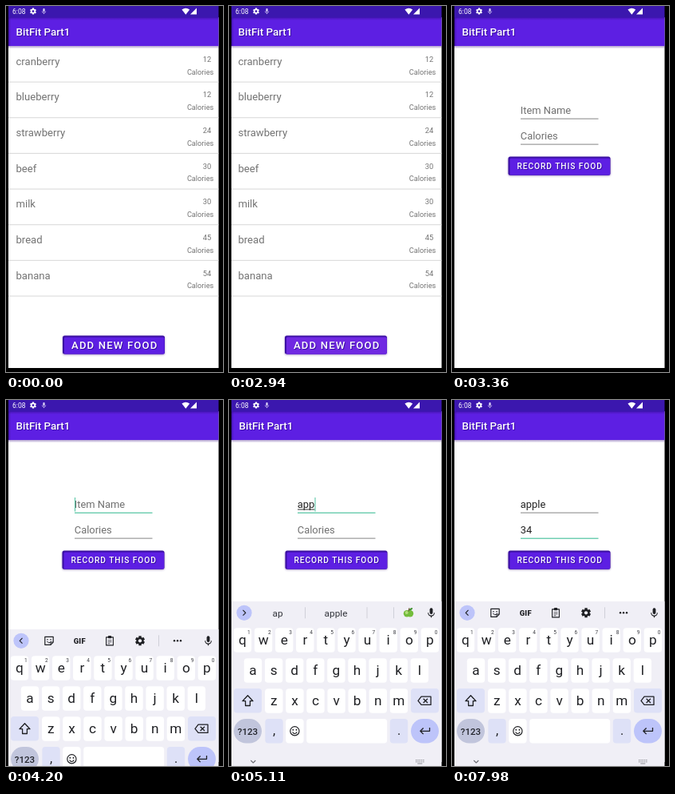
Write an HTML page with a canvas that moves like this. It is 272 px wide and 458 px high and loops after 8000 ms.

```html
<!DOCTYPE html>
<html lang="en">
<head>
<meta charset="utf-8">
<title>Food list</title>
<style>
html, body { margin: 0; width: 100%; height: 100%; overflow: hidden; background: #000; }
canvas { display: block; width: 272px; height: 458px; }
</style>
</head>
<body>
<canvas id="stage"></canvas>
<script>
const W = 272, H = 458, LOOP = 8000, STEP = 70;
const PURPLE = '#5d1fe3', DEEP = '#3a0fa2', TEAL = '#4fc3a0', INK = '#1f2024', GREY = '#737373';
const canvas = document.getElementById('stage');
const c = canvas.getContext('2d');
const dpr = window.devicePixelRatio || 1;
canvas.width = W * dpr;
canvas.height = H * dpr;

const clamp = v => Math.max(0, Math.min(1, v));
const font = (size, weight = 400) => `${weight} ${size}px Roboto, sans-serif`;

function text(s, x, y, size, color, { weight = 400, align = 'left', space = 0 } = {}) {
  c.font = font(size, weight);
  c.letterSpacing = space + 'px';
  c.textAlign = align;
  c.fillStyle = color;
  c.fillText(s, x, y);
  c.letterSpacing = '0px';
}

// White text with a dark edge to the lower right.
function raisedText(s, x, y, size, space = 0) {
  const style = { weight: 500, space };
  text(s, x + 1, y + .9, size, DEEP, style);
  text(s, x, y, size, '#fff', style);
}

function rect(x, y, w, h, color) {
  c.fillStyle = color;
  c.fillRect(x, y, w, h);
}

function round(x, y, w, h, r, color) {
  c.beginPath();
  c.roundRect(x, y, w, h, r);
  c.fillStyle = color;
  c.fill();
}

function disc(x, y, r, color) {
  c.beginPath();
  c.arc(x, y, r, 0, 7);
  c.fillStyle = color;
  c.fill();
}

function arc(x, y, r, from, to, color = INK, width = 1.1) {
  c.beginPath();
  c.arc(x, y, r, from, to);
  c.strokeStyle = color;
  c.lineWidth = width;
  c.stroke();
}

// Strokes a flat list of x, y pairs.
function line(pts, color = INK, width = 1.2, close = false) {
  c.beginPath();
  for (let i = 0; i < pts.length; i += 2) c.lineTo(pts[i], pts[i + 1]);
  if (close) c.closePath();
  c.strokeStyle = color;
  c.lineWidth = width;
  c.lineJoin = 'round';
  c.stroke();
}

function shade(x, y, w, h, color, across = false) {
  const g = c.createLinearGradient(x, y, across ? x + w : x, across ? y : y + h);
  g.addColorStop(0, color);
  g.addColorStop(1, 'rgba(60,20,140,0)');
  rect(x, y, w, h, g);
}

function at(x, y, draw) {
  c.save();
  c.translate(x, y);
  draw();
  c.restore();
}

function gear(x, y, r, color, hole) {
  at(x, y, () => {
    for (let i = 0; i < 6; i++) {
      c.rotate(Math.PI / 3);
      rect(-r * .28, -r, r * .56, r, color);
    }
    disc(0, 0, r * .76, color);
    disc(0, 0, r * .36, hole);
  });
}

function mic(x, y, k, color) {
  at(x, y, () => {
    c.scale(k, k);
    round(-1.9, -6, 3.8, 7.6, 1.9, color);
    arc(0, 0, 3.8, 0, Math.PI, color);
    line([0, 3.7, 0, 6], color, 1.2);
  });
}

function statusBar() {
  rect(3, 0, 264, 14.5, '#3b17ae');
  text('6:08', 8, 10, 8.6, '#fff');
  gear(34, 6.6, 4, '#fff', '#3b17ae');
  mic(47.5, 6.5, .6, '#ded5f8');
  c.fillStyle = '#fff';
  c.beginPath();
  c.moveTo(225.3, 10.7);
  c.lineTo(220.4, 4.6);
  c.quadraticCurveTo(225.3, 1, 230.2, 4.6);
  c.fill();
  c.beginPath();
  c.moveTo(239, 2.6);
  c.lineTo(239, 10.6);
  c.lineTo(231, 10.6);
  c.fill();
}

function page(dx, draw) {
  rect(3, 14, 264, 439, '#fff');
  rect(3, 14, 264, 36, PURPLE);
  shade(3, 14, 264, 4, 'rgba(40,5,130,.5)');
  shade(3, 14, 3, 36, 'rgba(40,5,130,.6)', true);
  shade(3, 50, 264, 3.5, 'rgba(90,50,150,.45)');
  at(dx, 0, () => {
    raisedText('BitFit Part1', 12.6, 37, 13.4);
    draw();
  });
}

function button(label, x, y, base, size, ripple = 0) {
  c.save();
  c.shadowColor = 'rgba(60,10,130,.5)';
  c.shadowBlur = 2.5 * dpr;
  c.shadowOffsetY = .8 * dpr;
  round(x, y, 128, 23.2, 2.5, DEEP);
  c.restore();
  c.save();
  c.beginPath();
  c.roundRect(x + 2, y + 2, 125.6, 21, 1.5);
  c.clip();
  rect(x, y, 128, 24, PURPLE);
  if (ripple) disc(x + 64, y + 12, 70 * ripple, '#7029e2');
  c.restore();
  raisedText(label, x + 11, base, size, size * .0893);
}

const foods = [['cranberry', 12], ['blueberry', 12], ['strawberry', 24],
  ['beef', 30], ['milk', 30], ['bread', 45], ['banana', 54]];

function listPage(dx, ripple) {
  page(dx, () => {
    foods.forEach(([name, kcal], i) => {
      const y = i * 44.65;
      text(name, 12.5, y + 73.7, 13.1, GREY);
      text(kcal, 252, y + 69.8, 9.3, GREY, { align: 'center' });
      text('Calories', 260.3, y + 85.5, 9.2, GREY, { align: 'right' });
      rect(-30, y + 94.6, 330, 1, '#d8d8d8');
    });
    button('ADD NEW FOOD', 71, 412.4, 429, 13.1, ripple);
  });
}

function field(value, hint, y, focused, cursor, composing) {
  text(value || hint, 85.8, y, 12.9, value ? '#222' : '#707070');
  const w = value ? c.measureText(value).width : 0;
  if (composing) rect(86, y + 1.5, w, 1, '#333');
  rect(86, y + 5.6, 97.5, focused ? 1.2 : 1, focused ? TEAL : '#858585');
  if (cursor) rect(86 + w, y - 13, 1, 17.5, TEAL);
}

// Latest entry of a [time, value] list.
const pick = (list, t) => list.reduce((v, e) => t >= e[0] ? e[1] : v, list[0][1]);

const names = [[0, ''], [4620, 'a'], [5040, 'ap'], [5110, 'app'], [5320, 'appl'], [5460, 'apple']];
const amounts = [[0, ''], [7280, '3'], [7490, '34']];
const hints = [[0, null], [4690, []], [4760, ['a', 'and', 'as']], [5110, ['ap', 'apple']],
  [5180, ['app', 'apple']], [5390, ['appl', 'apple']], [5670, ['apple', 'apples']], [5950, null]];
const blink = [[0, false], [5950, true], [6510, false], [7070, true], [7980, false]];

function formPage(dx, t) {
  const onName = t >= 4060 && t < 5950, onAmount = t >= 5950;
  const name = pick(names, t);
  page(dx, () => {
    field(name, 'Item Name', 135, onName, onName, onName && name);
    field(pick(amounts, t), 'Calories', 167, onAmount, pick(blink, t));
    button('RECORD THIS FOOD', 70.5, 188.6, 204, 10.2);
  });
}

function apple(x, y) {
  disc(x - 2, y + 1, 4.2, '#74bd3c');
  disc(x + 2, y + 1, 4.2, '#74bd3c');
  disc(x - 2.3, y - .3, 2, '#b4dd7c');
  line([x, y - 2, x + 1, y - 6], '#6b4a2b', 1.1);
  at(x + 3, y - 4.6, () => {
    c.rotate(-.5);
    c.beginPath();
    c.ellipse(0, 0, 2.4, 1.1, 0, 0, 7);
    c.fillStyle = '#3f9130';
    c.fill();
  });
}

function strip(words) {
  const y = 266.8, sep = x => rect(x, y - 7, 1, 14, '#cfd0d8');
  disc(19, y, 9.6, '#bdc4fa');
  const s = words ? -1 : 1;
  line([19 + s * 1.5, y - 3.4, 19 - s * 1.8, y, 19 + s * 1.5, y + 3.4]);
  mic(253.5, y, 1, INK);
  if (words) {
    sep(95);
    sep(172.5);
    [61, 134, 207].forEach((x, i) =>
      words[i] && text(words[i], x, y + 4.4, 11.8, '#33353c', { align: 'center' }));
    if (words.length === 2) {
      sep(206);
      apple(225, y);
    }
    return;
  }
  // sticker
  line([48.8, y - 5, 59.2, y - 5, 59.2, y + 1.8, 56, y + 5, 48.8, y + 5], INK, 1.2, true);
  line([59, y + 1.8, 56, y + 1.8, 56, y + 5], INK, 1);
  disc(52, y - 1.6, .8, INK);
  disc(56, y - 1.6, .8, INK);
  arc(54, y, 2.4, .2, 2.9, INK, 1);
  text('GIF', 92.3, y + 3.3, 9.4, INK, { weight: 900, align: 'center', space: .3 });
  // clipboard
  line([125.6, y - 4.4, 134.4, y - 4.4, 134.4, y + 5.6, 125.6, y + 5.6], INK, 1.1, true);
  round(127.8, y - 6.2, 4.4, 3.2, 1, INK);
  [-.6, 1.4, 3.4].forEach(d => line([127.6, y + d, 132.4 - (d > 3 ? 2 : 0), y + d], INK, .7));
  gear(168, y, 6, INK, '#f0eff6');
  sep(191);
  [-4, 0, 4].forEach(d => disc(215 + d, y, 1.2, INK));
}

function keys(row, x, y) {
  [...row].forEach((k, i) => {
    const cx = x + i * 26.1;
    round(cx - 11.2, y - 15, 22.4, 30.4, 4, '#fff');
    text(k, cx, y + 5.8, 17.2, INK, { align: 'center' });
    if (row.length === 10)
      text((i + 1) % 10, cx + 7.8, y - 7.6, 6.5, '#3c3d44', { align: 'center' });
  });
}

function keyboard(drop, words) {
  at(0, drop - .5, () => {
    rect(3, 252.5, 264, 206, '#f0eff6');
    strip(words);
    keys('qwertyuiop', 17, 300.8);
    keys('asdfghjkl', 30, 338.8);
    keys('zxcvbnm', 56.3, 376.8);

    const soft = '#dee1f7';
    round(6, 361.6, 35, 30.4, 4, soft);
    line([23.5, 370.3, 17, 377.2, 20.6, 377.2, 20.6, 383, 26.4, 383, 26.4, 377.2, 30, 377.2], INK, 1.3, true);
    round(228, 361.6, 35, 30.4, 4, soft);
    line([237, 376.8, 241, 371.7, 253, 371.7, 253, 381.9, 241, 381.9], INK, 1.3, true);
    line([243.6, 374.3, 249, 379.5], INK, 1.3);
    line([249, 374.3, 243.6, 379.5], INK, 1.3);

    round(6, 399.4, 35, 30.6, 15.3, '#c1c5dc');
    text('?123', 23.5, 419, 11.6, '#22242b', { weight: 500, align: 'center' });
    round(45.3, 399.4, 22.4, 30.6, 4, soft);
    text(',', 56.5, 419.5, 16, INK, { align: 'center' });
    round(71.2, 399.4, 22.4, 30.6, 4, '#fff');
    arc(82.4, 414.8, 5.6, 0, 7, INK, 1.2);
    disc(80.3, 413.2, .95, INK);
    disc(84.5, 413.2, .95, INK);
    arc(82.4, 415.2, 2.8, .25, 2.9, INK, 1.2);
    round(97.2, 399.4, 101, 30.6, 4, '#fff');
    round(201.8, 399.4, 22.4, 30.6, 4, soft);
    text('.', 213, 419.5, 16, INK, { align: 'center' });
    round(228, 399.4, 35, 30.6, 15.3, '#bdc4fa');
    line([251.5, 410.5, 251.5, 414.8, 240, 414.8], INK, 1.3);
    line([243.6, 411, 239.8, 414.8, 243.6, 418.6], INK, 1.3);

    line([27.3, 451.5, 30.3, 454.5, 33.3, 451.5], '#6c6d74', 1.1);
    for (let i = 0; i < 10; i++)
      rect(234 + i % 5 * 2.3, 450.5 + Math.floor(i / 5) * 2.2, 1.3, 1.2, '#8d8e95');
    rect(236.3, 455, 6, 1, '#8d8e95');
  });
}

// Quick start with a long, slow settle.
const settle = u => u < 1 / 6 ? .4 * (6 * u) ** 2.7 : 1 - .6 * Math.exp(-(u - 1 / 6) * 11);

function draw(ms) {
  const t = Math.floor((ms % LOOP) / STEP) * STEP;
  c.setTransform(dpr, 0, 0, dpr, 0, 0);
  rect(0, 0, W, H, '#000');
  c.save();
  c.beginPath();
  c.rect(3, 0, 263.5, H);
  c.clip();

  const since = t - 2908;
  const slide = t >= 3360 ? 1 : settle(clamp(since / 450));
  const fade = clamp((since - 50) / 83);
  if (fade < 1) listPage(-26 * slide, t < 2660 ? 0 : clamp((t - 2590) / 280));
  if (fade > 0) {
    c.globalAlpha = fade;
    formPage(26 * (1 - slide), t);
    c.globalAlpha = 1;
  }
  statusBar();
  if (t >= 4130) {
    const drop = t >= 4340 ? 0 : 35 * Math.exp((4200 - t) / 58);
    keyboard(drop, pick(hints, t));
  }
  c.restore();
}

const start = performance.now();
function tick() {
  draw(performance.now() - start);
  requestAnimationFrame(tick);
}
tick();
</script>
</body>
</html>
```
